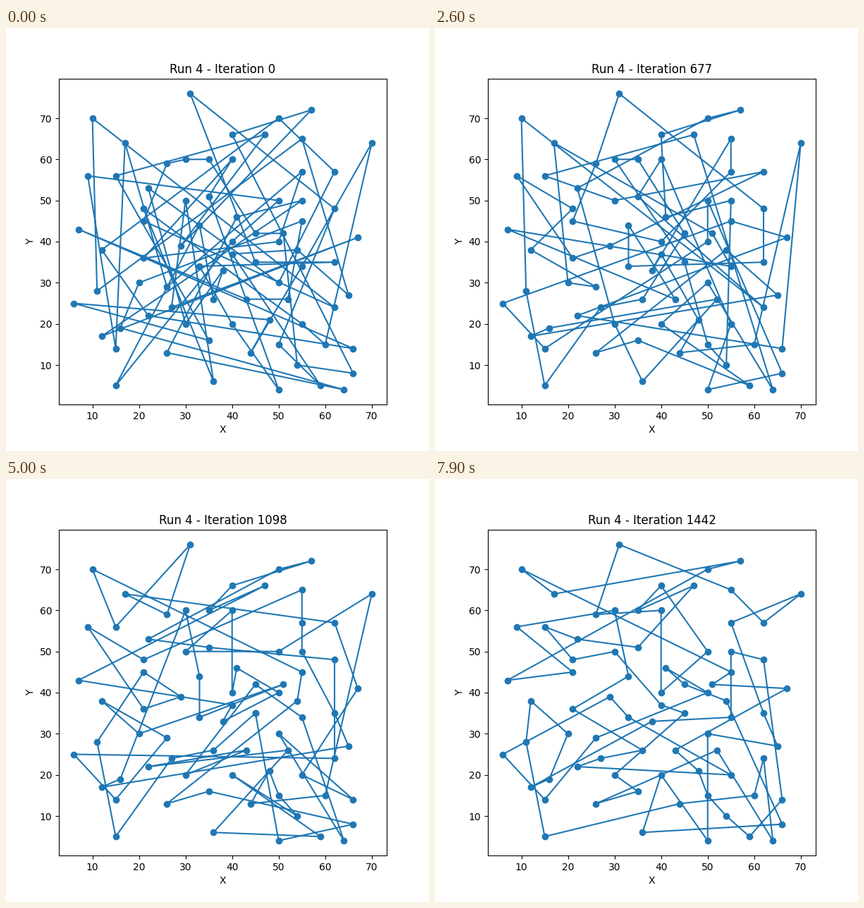
A matplotlib script for the animation above (8 s loop, 600 px wide and 600 px high).

```python
import math
import random
from itertools import pairwise

import numpy as np
import matplotlib.pyplot as plt
from matplotlib.animation import FuncAnimation

FRAMES = 80
END_LENGTH = 1290

# Stops by column: x -> y values
COLUMNS = {
    6: [25], 7: [43], 9: [56], 10: [70], 11: [28], 12: [17, 38],
    15: [5, 14, 56], 16: [19], 17: [64], 20: [30], 21: [36, 45, 48],
    22: [22, 53], 26: [13, 29, 59], 27: [24], 29: [39], 30: [20, 50, 60],
    31: [76], 33: [34, 44], 35: [16, 51, 60], 36: [6, 26], 38: [33],
    40: [20, 37, 40, 60, 66], 41: [46], 43: [26], 44: [13], 45: [35, 42],
    47: [66], 48: [21], 50: [4, 15, 30, 40, 50, 70], 51: [42], 52: [26],
    54: [10, 38], 55: [20, 34, 45, 50, 57, 65], 57: [72], 59: [5], 60: [15],
    62: [24, 35, 48, 57], 64: [4], 65: [27], 66: [8, 14], 67: [41], 70: [64],
}
STOPS = [(x, y) for x, ys in COLUMNS.items() for y in ys]

# Iteration shown in the title, by frame
COUNTER = {0: 0, 8: 46, 19: 453, 34: 933, 43: 994, 57: 1201, 79: 1442}


def closed(tour):
    return [*tour, tour[0]]


def length(tour):
    return sum(math.dist(a, b) for a, b in pairwise(closed(tour)))


def flip(tour, rng):
    """Random 2-opt move: reverse one stretch of the tour."""
    i, j = sorted(rng.sample(range(len(tour)), k=2))
    return tour[:i] + tour[i:j][::-1] + tour[j:]


def anneal(seed=4):
    """Shorten a shuffled tour along a falling target length."""
    rng = random.Random(seed)
    tour = rng.sample(STOPS, len(STOPS))
    start = length(tour)
    tours = [tour]
    while len(tours) < FRAMES:
        left = 1 - len(tours) / FRAMES
        goal = END_LENGTH + (start - END_LENGTH) * left ** 1.4
        for _ in range(3):
            options = [flip(tour, rng) for _ in range(60)]
            tour = min(options, key=lambda t: abs(length(t) - goal))
        tours.append(tour)
    return tours


TOURS = anneal()

fig, ax = plt.subplots(figsize=(6, 6), dpi=100)
line, = ax.plot(*zip(*closed(STOPS)), "o-")
title = ax.set_title("")
ax.set_xlabel("X")
ax.set_ylabel("Y")


def draw(k):
    line.set_data(*zip(*closed(TOURS[k])))
    count = np.interp(k, list(COUNTER), list(COUNTER.values()))
    title.set_text(f"Run 4 - Iteration {round(count)}")
    return line, title


anim = FuncAnimation(fig, draw, frames=FRAMES, interval=100, repeat=True)
plt.show()
```
